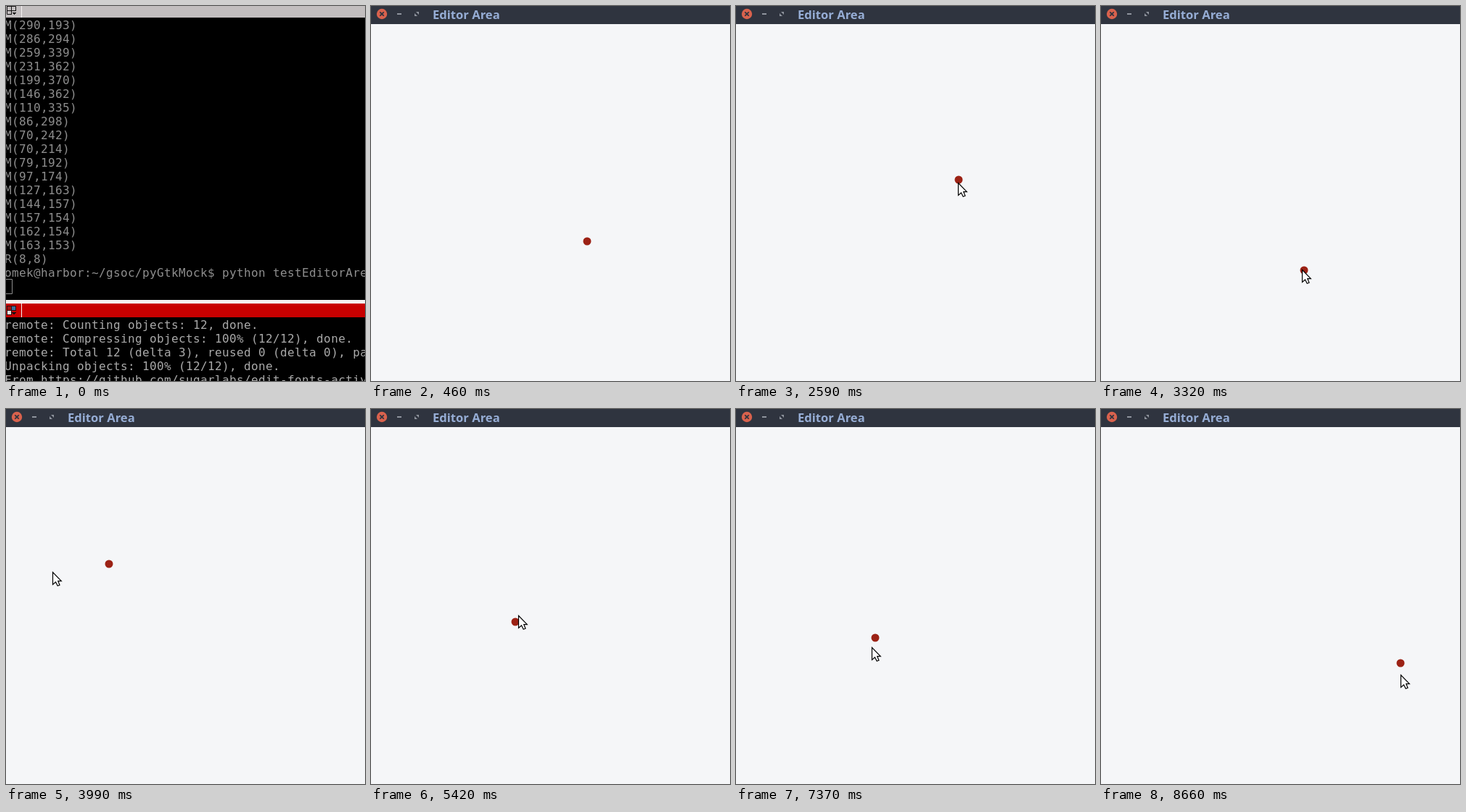
These frames come from a looping animation (495x518 px, 8.79 s). An HTML page with a canvas:

```html
<!DOCTYPE html>
<html>
<head>
<meta charset="utf-8">
<title>Editor Area</title>
<style>
html, body { margin: 0; width: 495px; height: 518px; overflow: hidden; background: #000; }
canvas { display: block; }
</style>
</head>
<body>
<canvas id="stage" width="495" height="518"></canvas>
<script>
const LOOP = 8790;
const ctx = document.getElementById('stage').getContext('2d');

const topText = `M(290,193)
M(286,294)
M(259,339)
M(231,362)
M(199,370)
M(146,362)
M(110,335)
M(86,298)
M(70,242)
M(70,214)
M(79,192)
M(97,174)
M(127,163)
M(144,157)
M(157,154)
M(162,154)
M(163,153)
R(8,8)
omek@harbor:~/gsoc/pyGtkMock$ python testEditorArea.py`;

const bottomText = `remote: Counting objects: 12, done.
remote: Compressing objects: 100% (12/12), done.
remote: Total 12 (delta 3), reused 0 (delta 0), pack-reused 0
Unpacking objects: 100% (12/12), done.
From https://github.com/sugarlabs/edit-fonts-activity`;

const pt = (x, y) => ({ x, y });
const mix = (a, b, u) => pt(a.x + (b.x - a.x) * u, a.y + (b.y - a.y) * u);

// Point on the Bezier curve of any degree.
function bezier(points, u) {
  while (points.length > 1) points = points.slice(1).map((p, i) => mix(points[i], p, u));
  return points[0];
}

// Each move takes the pointer, and in a drag the dot, along a curve from where it was.
const moves = [];
let pointer = pt(446, 289), dot = pt(298, 325);

function move(start, end, steps, pointerCurve, dotCurve = []) {
  const m = { start, end, steps, pointer: [pointer, ...pointerCurve], dot: [dot, ...dotCurve] };
  moves.push(m);
  pointer = m.pointer.at(-1);
  dot = m.dot.at(-1);
}

move(710, 1430, 15, [pt(320, 300), pt(295, 323)]);
move(1740, 2590, 14, [pt(165, 250), pt(270, 70), pt(306, 245)],
  [pt(170, 255), pt(272, 76), pt(307, 240)]);
move(2650, 3490, 15, [pt(117, 390), pt(260, 427), pt(319, 315)],
  [pt(123, 385), pt(262, 422), pt(322, 320)]);
move(3550, 4400, 15, [pt(190, -77), pt(-160, 437), pt(192, 310)],
  [pt(300, -70), pt(-62, 398), pt(194, 312)]);
move(4440, 5170, 19, [pt(250, 365), pt(115, 365), pt(194, 308)]);
move(5420, 5590, 4, [pt(205, 269), pt(269, 187)], [pt(195, 285), pt(271, 187)]);
move(5780, 6540, 18, [pt(262, 301), pt(270, 188)]);
move(6750, 6940, 4, [pt(189, 314)], [pt(192, 316)]);
move(7190, 7230, 2, [pt(191, 333)]);
move(7370, 7530, 5, [pt(179, 327), pt(190, 310)]);
move(7720, 7920, 6, [pt(193, 302), pt(191, 312)]);
move(8200, 8360, 4, [pt(412, 349)], [pt(413, 351)]);
move(8620, 8660, 2, [pt(413, 368)]);

function poseAt(t) {
  const m = moves.findLast(m => m.start <= t);
  if (!m) return { dot: moves[0].dot[0] };
  const step = Math.floor((t - m.start) / (m.end - m.start) * (m.steps - 1) + 1e-6) + 1;
  const u = Math.min(step / m.steps, 1);
  return { pointer: bezier(m.pointer, u), dot: bezier(m.dot, u) };
}

function rect(color, x, y, w, h) {
  ctx.fillStyle = color;
  ctx.fillRect(x, y, w, h);
}

function disc(color, x, y, r) {
  ctx.fillStyle = color;
  ctx.beginPath();
  ctx.arc(x, y, r, 0, 7);
  ctx.fill();
}

function stroke(color, width, d) {
  ctx.strokeStyle = color;
  ctx.lineWidth = width;
  ctx.stroke(new Path2D(d));
}

function print(text, y, color) {
  ctx.font = '16px "DejaVu Sans Mono", monospace';
  ctx.letterSpacing = '0.37px';
  ctx.fillStyle = color;
  text.split('\n').forEach((line, i) => ctx.fillText(line, -2, y + 19 * i));
  ctx.letterSpacing = '0px';
}

function drawTerminal() {
  rect('#000', 0, 0, 495, 518);
  rect('#c2bebf', 0, 0, 495, 16);
  rect('#f4f2f2', 21, 0, 1, 16);
  stroke('#111', 1, 'M1.5 0V11.5H8M1.5 .5H13.5V7M7.5 0V11.5M1 6.5H13.5M9 9.5H14M10 10.5H13M11 11.5H12');
  print(topText, 32, '#8e8e8e');
  stroke('#8e8e8e', 1, 'M-1 377.5H8.5V397.5H-1');

  rect('#f4f2f2', 0, 406, 495, 5);
  rect('#c80000', 0, 411, 495, 19);
  rect('#f4f2f2', 21, 411, 1, 19);
  rect('#2b1010', 1, 414, 13, 13);
  rect('#a01515', 2, 415, 5, 5);
  rect('#3c6e9c', 8, 415, 5, 5);
  rect('#e8e4e4', 2, 421, 5, 5);
  rect('#c80000', 8, 421, 6, 6);
  stroke('#111', 1, 'M8 423.5H14M9 424.5H13M10 425.5H12');
  print(bottomText, 446, '#aaa');
}

function drawWindow(dot) {
  rect('#f5f6f8', 0, 0, 495, 518);
  rect('#2f343f', 0, 0, 495, 25);
  disc('#d9624d', 15, 11, 7.2);
  stroke('#2f343f', 1.8, 'M12.3 8.3L17.7 13.7M17.7 8.3L12.3 13.7');
  rect('#8f949d', 36, 10, 6, 2);
  ctx.fillStyle = '#8f949d';
  ctx.fill(new Path2D('M62 8H66V12ZM60 10V14H64Z'));
  ctx.font = 'bold 16.6px "Noto Sans", sans-serif';
  ctx.fillStyle = '#96add5';
  ctx.fillText('Editor Area', 85, 18);
  disc('#9c2215', Math.round(dot.x), Math.round(dot.y), 5.5);
}

function drawPointer({ x, y }) {
  const arrow = new Path2D('M.5 .5V17.5L4.5 14L7.2 19.2L10 18.2L7.8 12.7H12.3Z');
  ctx.save();
  ctx.translate(Math.round(x), Math.round(y) - 1);
  ctx.fillStyle = '#fff';
  ctx.fill(arrow);
  ctx.strokeStyle = '#000';
  ctx.lineWidth = 1.2;
  ctx.stroke(arrow);
  ctx.restore();
}

function draw(t) {
  const pose = poseAt(t);
  // The window fades in over the terminal in three steps of 80 ms.
  const alpha = t < 300 ? 0 : Math.min(1, Math.floor((t - 220) / 80) / 3);
  if (alpha < 1) drawTerminal();
  ctx.globalAlpha = alpha;
  drawWindow(pose.dot);
  ctx.globalAlpha = 1;
  if (pose.pointer) drawPointer(pose.pointer);
}

function tick() {
  draw(performance.now() % LOOP);
  requestAnimationFrame(tick);
}
tick();
</script>
</body>
</html>
```
